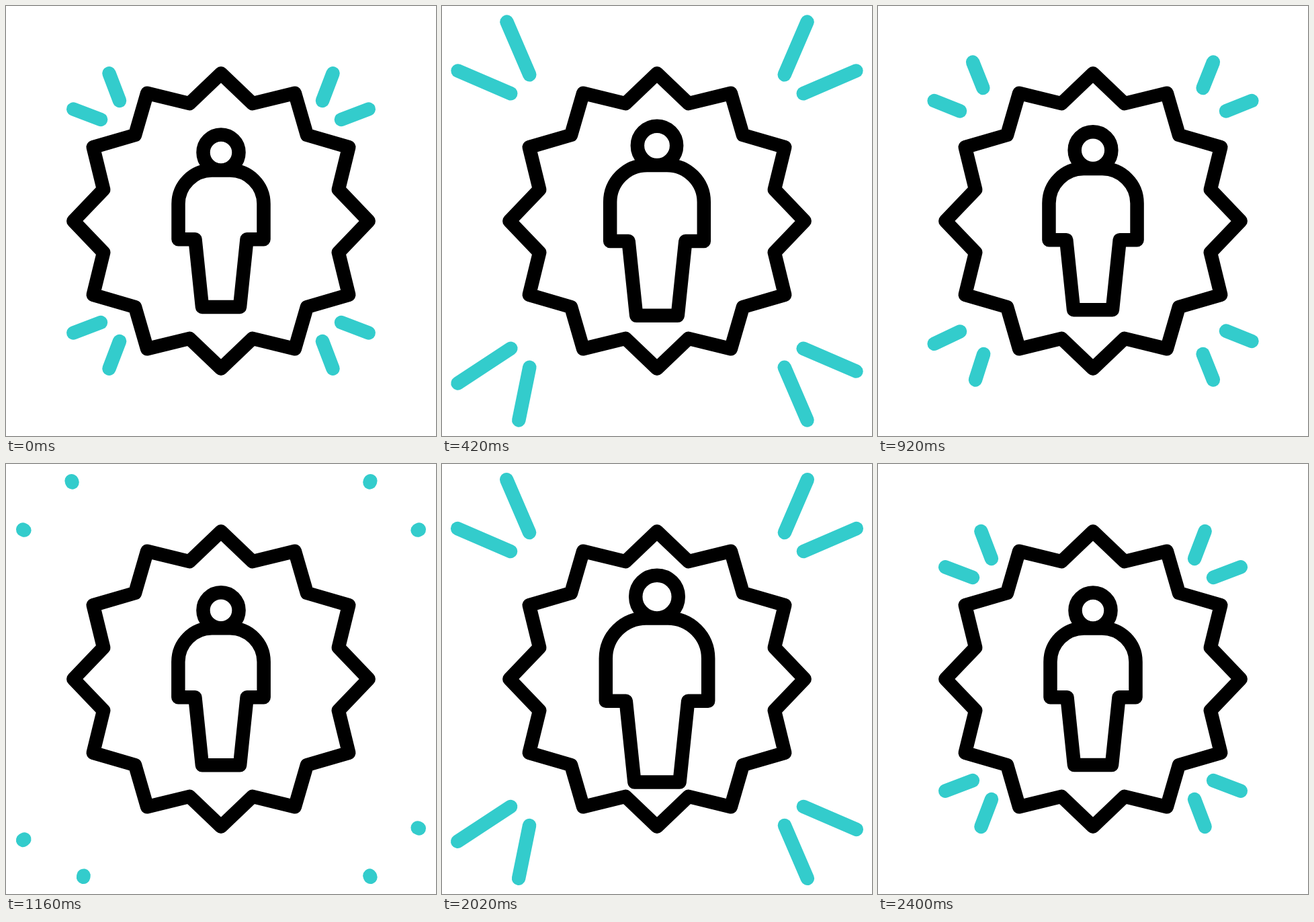
Write an HTML page with a canvas that moves like this. It is 640 px wide and 640 px high and loops after 2420 ms.

```html
<!DOCTYPE html>
<html lang="en">
<head>
<meta charset="utf-8">
<title>Badge with person</title>
<style>
  html, body { margin: 0; width: 100%; height: 100%; overflow: hidden; background: #fff; }
  canvas { display: block; width: 640px; height: 640px; }
</style>
</head>
<body>
<canvas id="stage" width="640" height="640"></canvas>
<script>
const ctx = document.getElementById('stage').getContext('2d');
const SIZE = 640, LOOP = 2420, STEP = 20;
const HIDE = 1200, SHOW = 1590;

const lerp = (a, b, k) => a + (b - a) * k;

// Smooth rise from 0 to 1 between two times.
function ramp(t, from, to) {
  const u = Math.min(1, Math.max(0, (t - from) / (to - from)));
  return u * u * (3 - 2 * u);
}

const rayReach = t => t < HIDE
  ? ramp(t, 0, 400) - ramp(t, 400, 800) + ramp(t, 800, HIDE)
  : ramp(t, SHOW, 2030) - ramp(t, 2030, 2410);

const personScale = t => 1 + 0.1 * (ramp(t, 0, 400) - ramp(t, 400, 1240)
  - ramp(t, 1400, 1600) + 3 * ramp(t, 1600, 2020) - 2 * ramp(t, 2020, 2410));

function drawBadge() {
  ctx.beginPath();
  for (let i = 0; i < 24; i++) {
    const angle = i * Math.PI / 12, radius = i % 2 ? 181 : 219.7;
    ctx.lineTo(radius * Math.sin(angle), -radius * Math.cos(angle));
  }
  ctx.closePath();
  ctx.stroke();
}

function drawPerson(scale) {
  // The scale is applied to the path only, so the stroke keeps its width.
  ctx.save();
  ctx.scale(scale, scale);
  ctx.beginPath();
  ctx.arc(0, -102, 26.5, 0, Math.PI * 2);
  for (const side of [-1, 1]) {
    ctx.moveTo(0, 128);
    ctx.lineTo(side * 28, 128);
    ctx.lineTo(side * 38.5, 27.3);
    ctx.lineTo(side * 63.5, 27.3);
    ctx.arcTo(side * 63.5, -75.5, 0, -75.5, 50);
    ctx.lineTo(0, -75.5);
  }
  ctx.restore();
  ctx.stroke();
}

// One steep ray in the corner (sx, sy); swapping the axes gives the flat one.
function traceRay(sx, sy, swap, lean, reach, start, end) {
  const inner = [151 + 39 * reach, 179 + 39 * reach];
  const outer = [166.5 + (57.5 + lean) * reach, 219.7 + 77.3 * reach];
  const point = k => {
    const [a, b] = [0, 1].map(i => lerp(inner[i], outer[i], k));
    return swap ? [sx * b, sy * a] : [sx * a, sy * b];
  };
  ctx.moveTo(...point(start));
  ctx.lineTo(...point(end));
}

function drawRays(t) {
  if (t >= HIDE && t <= SHOW) return;
  const reach = rayReach(t);
  const start = t < HIDE ? ramp(t, 800, HIDE) : 0;
  const end = t > SHOW ? ramp(t, SHOW, 2030) : 1;
  ctx.beginPath();
  for (const sx of [-1, 1]) {
    for (const sy of [-1, 1]) {
      // The bottom left pair tilts as it extends.
      const lean = sx < 0 && sy > 0 ? 18 : 0;
      traceRay(sx, sy, false, -lean, reach, start, end);
      traceRay(sx, sy, true, lean, reach, start, end);
    }
  }
  ctx.stroke();
}

function draw(t) {
  ctx.setTransform(1, 0, 0, 1, 0, 0);
  ctx.fillStyle = '#fff';
  ctx.fillRect(0, 0, SIZE, SIZE);
  ctx.translate(SIZE / 2, SIZE / 2);
  ctx.lineWidth = 20.5;
  ctx.lineCap = ctx.lineJoin = 'round';
  ctx.strokeStyle = '#000';
  drawBadge();
  drawPerson(personScale(t));
  ctx.strokeStyle = '#33cccc';
  drawRays(t);
}

let origin;
function tick(now) {
  origin ??= now;
  const t = Math.max(0, now - origin) % LOOP;
  draw(Math.floor(t / STEP) * STEP);
  requestAnimationFrame(tick);
}
draw(0);
requestAnimationFrame(tick);
</script>
</body>
</html>
```
